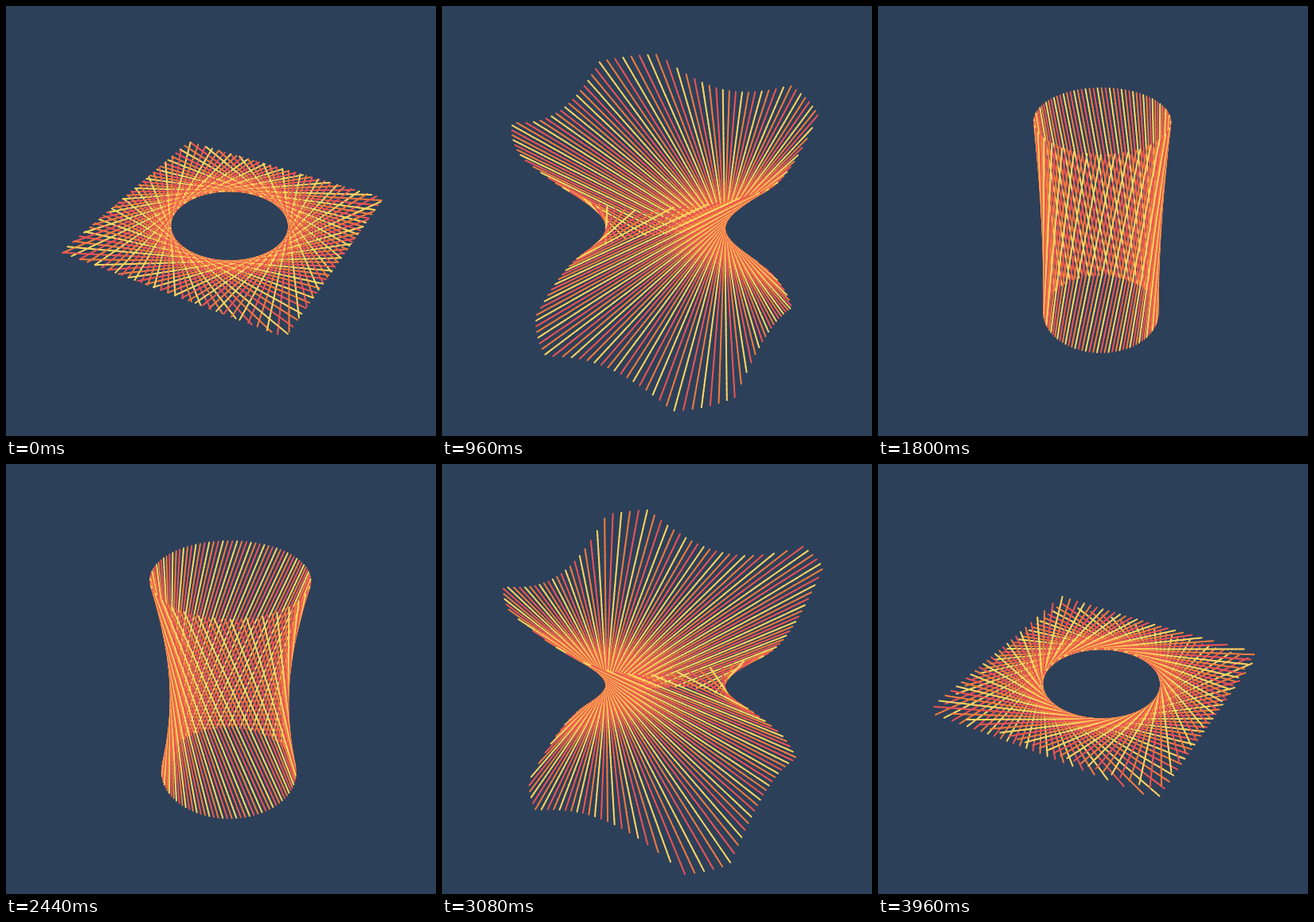
Write an HTML page with a canvas that moves like this. It is 540 px wide and 540 px high and loops after 4 s.

```html
<!DOCTYPE html>
<html lang="en">
<head>
<meta charset="utf-8">
<title>Ruled hyperboloid</title>
<style>
  html, body { margin: 0; width: 100%; height: 100%; overflow: hidden; background: #2d4059; }
  canvas { display: block; }
</style>
</head>
<body>
<canvas id="stage" width="540" height="540"></canvas>
<script>
const ctx = document.getElementById('stage').getContext('2d');

const LINES = 99, PIECES = 60, RADIUS = 0.25;
const STEPS = 100, STEP_MS = 40;
const COLORS = ['#ea5455', '#f07b3f', '#ffd460'];

const dot = (a, b) => a[0] * b[0] + a[1] * b[1] + a[2] * b[2];

// Axes of a camera looking along -direction, with z upward.
function cameraAxes(direction) {
  const size = Math.hypot(...direction);
  const [x, y, z] = direction.map(v => v / size);
  const flat = Math.hypot(x, y);
  return {
    toward: [x, y, z],
    right: [-y / flat, x / flat, 0],
    up: [-x * z / flat, -y * z / flat, flat]
  };
}

// The camera aims slightly beside the centre of the unit cube,
// so that the projected cube sits in the middle of the view.
const EYE = [1.3, -2.4, 2];
const AIM_LEFT = 0.0354, AIM_DOWN = 0.0552;
const SCALE = 1005, VIEW_X = 270, VIEW_Y = 290;

const centered = cameraAxes(EYE);
const aim = EYE.map((_, i) => -AIM_LEFT * centered.right[i] - AIM_DOWN * centered.up[i]);
const camera = cameraAxes(EYE.map((v, i) => v - aim[i]));

function project(p) {
  const offset = p.map((v, i) => v - EYE[i]);
  const depth = -dot(offset, camera.toward);
  return {
    x: VIEW_X + SCALE * dot(offset, camera.right) / depth,
    y: VIEW_Y - SCALE * dot(offset, camera.up) / depth,
    depth
  };
}

// Distance from a point inside the cube to its surface along a direction.
const reach = (p, d) =>
  Math.min(...d.map((v, i) => (0.5 - p[i] * Math.sign(v)) / Math.abs(v)));

function lineSegments(index, tilt) {
  const angle = 2 * Math.PI * index / LINES;
  const c = Math.cos(angle), s = Math.sin(angle);
  const origin = [RADIUS * c, RADIUS * s, 0];
  const dir = [-s * Math.cos(tilt), c * Math.cos(tilt), Math.sin(tilt)];
  const start = -reach(origin, dir.map(v => -v));
  const length = reach(origin, dir) - start;
  const segments = [];
  let previous = null;
  for (let i = 0; i <= PIECES; i++) {
    const along = start + length * i / PIECES;
    const point = project(origin.map((v, axis) => v + along * dir[axis]));
    if (previous) {
      segments.push({
        from: previous, to: point,
        depth: previous.depth + point.depth,
        color: COLORS[index % 3]
      });
    }
    previous = point;
  }
  return segments;
}

function draw(tilt) {
  const segments = [];
  for (let i = 0; i < LINES; i++) segments.push(...lineSegments(i, tilt));
  segments.sort((a, b) => b.depth - a.depth);

  ctx.fillStyle = '#2d4059';
  ctx.fillRect(0, 0, 540, 540);
  ctx.lineWidth = 2;
  ctx.lineCap = 'round';
  for (const { from, to, color } of segments) {
    ctx.strokeStyle = color;
    ctx.beginPath();
    ctx.moveTo(from.x, from.y);
    ctx.lineTo(to.x, to.y);
    ctx.stroke();
  }
}

let shown = -1;
function tick(now) {
  const step = Math.floor((now + 0.5) / STEP_MS) % STEPS;
  if (step !== shown) {
    shown = step;
    draw(Math.PI * step / STEPS);
  }
  requestAnimationFrame(tick);
}
draw(0);
requestAnimationFrame(tick);
</script>
</body>
</html>
```
